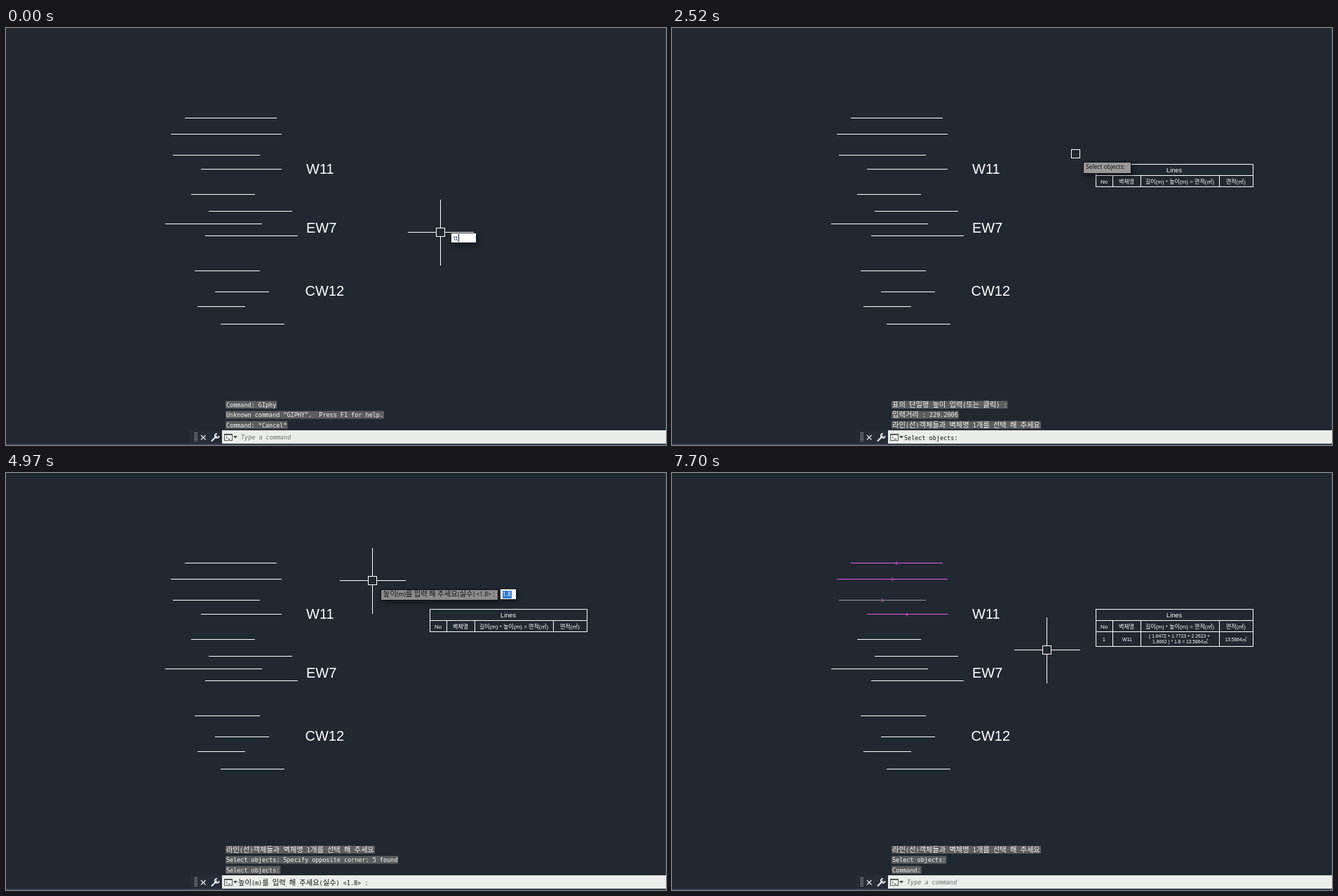
Recreate the animation shown at these times as an HTML page. Size 941 by 595 pixels, loop 8000 ms.

```html
<!DOCTYPE html>
<html lang="ko">
<head>
<meta charset="utf-8">
<title>Area table command</title>
<style>
html, body { margin: 0; width: 100%; height: 100%; overflow: hidden; background: #212830; }
svg { display: block; }
text { white-space: pre; }
.mono { font-family: "DejaVu Sans Mono", monospace; font-size: 8.46px; }
.ui { font-family: "Noto Sans", "Open Sans", sans-serif; font-size: 8.4px; }
.cad { font-family: "Liberation Sans", Arial, sans-serif; fill: #fff; }
.ko { font-family: "Noto Sans CJK KR", "Noto Sans CJK", sans-serif; }
.crisp { shape-rendering: crispEdges; }
.tip { filter: drop-shadow(3px 4px 4px rgba(0, 0, 0, .4)); }
</style>
</head>
<body>
<svg id="stage" width="941" height="595" viewBox="0 0 941 595"></svg>
<script>
const LOOP = 8000, STEP = 70;
const svg = document.getElementById('stage');

// Drawing: [x1, x2, y]
const LINES = [
  [255, 386, 128], [235, 393, 151], [238, 362, 181], [278, 393, 201],
  [264, 355, 237], [289, 408, 261], [227, 365, 279], [284, 416, 296],
  [269, 362, 346], [298, 375, 376], [273, 341, 397], [306, 397, 422]
];
const NAMES = [['W11', 428, 208], ['EW7', 428, 292], ['CW12', 426.5, 382]];

const ASK_TABLE = '새로운 표 생성(기본값)/다른 표 선택(s)';
const ASK_POINT = '표가 삽입 될 위치를 선택 해 주세요';
const ASK_ROW = '표의 단일행 높이 입력(또는 클릭) :';
const ASK_LINES = '라인(선)객체들과 벽체명 1개를 선택 해 주세요';
const ASK_HEIGHT = '높이(m)를 입력 해 주세요(실수) <1.8> :';
const SELECT = 'Select objects:';
const CORNER = 'Specify opposite corner:';
const ASK_FULL = ASK_TABLE + ' [기본값/s] <기본값> :';

const HISTORY = [
  'Command: GIphy', 'Unknown command “GIPHY”.  Press F1 for help.', 'Command: *Cancel*',
  'Command: TTT', ASK_FULL, ASK_POINT, ASK_ROW, '입력거리 : 229.2006', ASK_LINES,
  `${SELECT} ${CORNER} 5 found`, SELECT, ASK_HEIGHT, ASK_LINES, SELECT, 'Command:'
];

// start, first history row, prompt, cursor, tooltip [text, width]
const SCENES = [
  [0, 0, '', 'cross'],
  [420, 1, ASK_FULL, 'cross', [ASK_TABLE, 142]],
  [1190, 2, ASK_POINT, 'point', [ASK_POINT, 148]],
  [1750, 3, ASK_ROW, 'point', [ASK_ROW, 150]],
  [2450, 6, SELECT, 'pick', [SELECT, 69]],
  [3780, 6, `${SELECT} ${CORNER}`, 'point', [CORNER, 104]],
  [4200, 7, SELECT, 'pick', [SELECT, 69]],
  [4410, 8, ASK_HEIGHT, 'cross', [ASK_HEIGHT, 168]],
  [5390, 10, SELECT, 'pick', [SELECT, 69]],
  [7560, 12, '', 'cross']
];

// Cursor path: [time, x, y]
const PATH = [
  [0, 619, 291], [420, 619, 291], [700, 621, 292], [1120, 621, 292], [1330, 655, 262],
  [1610, 608, 199], [1680, 604, 194], [1750, 604, 194], [1960, 606, 182], [2240, 604, 179],
  [2450, 604, 179], [2800, 460, 179], [2940, 433, 212], [3080, 443, 232], [3150, 443, 232],
  [3290, 447, 232], [3360, 447, 232], [3500, 450, 227], [3710, 450, 227], [4130, 254, 64],
  [4200, 251, 64], [4340, 251, 64], [4550, 478, 139], [4970, 522, 153], [5040, 522, 153],
  [5180, 525, 155], [5740, 525, 155], [5950, 560, 190], [6160, 552, 242], [6230, 552, 242],
  [6370, 530, 259], [6510, 530, 259], [6580, 524, 261], [6650, 524, 261], [6930, 497, 255],
  [7140, 510, 246], [7350, 534, 252], [LOOP, 534, 252]
];

function cursorAt(t) {
  const i = Math.max(1, PATH.findIndex(p => p[0] >= t));
  const [a, b] = [PATH[i - 1], PATH[i]];
  const k = (t - a[0]) / (b[0] - a[0]);
  return [1, 2].map(n => Math.round(a[n] + (b[n] - a[n]) * k));
}

const esc = s => s.replace(/&/g, '&amp;').replace(/</g, '&lt;');
const mixed = (s, size) =>
  esc(s).replace(/[가-힣㎡]+/g, m => `<tspan class="ko" font-size="${size}">${m}</tspan>`);
const text = (s, x, y, cls, koSize, attrs = '') =>
  `<text x="${x}" y="${y}" class="${cls}" ${attrs}>${mixed(s, koSize)}</text>`;
const rect = (x, y, w, h, fill, attrs = '') =>
  `<rect x="${x}" y="${y}" width="${w}" height="${h}" fill="${fill}" ${attrs}/>`;
const path = (d, stroke, attrs = '') =>
  `<path d="${d}" fill="none" stroke="${stroke}" ${attrs}/>`;
const CRISP = 'class="crisp"';
const monoWidth = s => [...s].reduce((w, c) => w + (/[가-힣]/.test(c) ? 9.46 : 5.09), 0);

function drawing(t, x, y) {
  const done = t >= 5320, picked = t >= 4200 && t < 4410, drag = t >= 3780 && t < 4200;
  let out = '';
  LINES.forEach(([x1, x2, ly], i) => {
    const d = `M${x1} ${ly + .5}H${x2}`;
    if (i < 4 && (picked || (drag && ly > y && x2 > x))) {
      out += path(`M${x1 - 1} ${ly + .5}H${x2 + 1}`, '#2c62cf', 'stroke-width="3" stroke-linecap="round"')
        + path(d, '#a9c8ff', CRISP);
    } else {
      const color = done && i < 4 ? (i === 2 ? '#979a9d' : '#ee55ee') : '#fff';
      out += path(d, color, CRISP);
    }
    if (done && i < 4) {
      out += text('1', Math.floor((x1 + x2) / 2), ly + 2.7, 'cad', 6,
        'font-size="6.5" text-anchor="middle" style="fill:#ee55ee"');
    }
  });
  NAMES.forEach(([s, nx, ny], i) => {
    const glow = i === 0 && picked ? 'style="fill:#c4dcff;filter:drop-shadow(0 0 1px #2c62cf)"' : '';
    out += text(s, nx, ny, 'cad', 20, `font-size="20" ${glow}`);
  });
  return out;
}

function table(t) {
  if (t < 2450) return '';
  const row = t >= 5390, end = row ? 247 : 226;
  const cell = (s, x, y, size) =>
    text(s, x, y, 'cad', size, `font-size="${size}" text-anchor="middle"`);
  let out = path(`M604.5 194.5H828.5V${end}.5H604.5ZM604 210.5H829M604 226.5H829`
    + [628, 668, 780].map(x => `M${x}.5 210V${end}`).join(''), '#fff', CRISP);
  out += cell('Lines', 716, 206, 9.2) + cell('No', 616, 222, 8) + cell('벽체명', 648, 222, 8)
    + cell('길이(m) * 높이(m) = 면적(㎡)', 724, 221.5, 8) + cell('면적(㎡)', 804, 221.5, 8);
  if (row) {
    out += cell('1', 616, 240, 6.8) + cell('W11', 649, 240, 7)
      + cell('( 1.6472 + 1.7723 + 2.2623 +', 723.5, 235, 6.73)
      + cell('1.8662 ) * 1.8 = 13.5864㎡', 724.5, 243, 6.73)
      + cell('13.5864㎡', 804, 240, 6.73);
  }
  return out;
}

function commandBar(t, first, prompt) {
  let out = '';
  HISTORY.slice(first, first + 3).forEach((s, i) => {
    const y = 532 + i * 14.4;
    out += rect(313, y, monoWidth(s) + 2, 11, '#5c5d5e', 'rx="1"')
      + text(s, 314, y + 8.8, 'mono', 10.28, 'fill="#f4f4f4"');
  });
  const active = t >= 4270 && t < 4410;
  out += rect(0, 593, 941, 2, '#353e4d') + rect(940, 0, 1, 574, '#343c47')
    + rect(263, 574, 45, 19, '#262d37')
    + rect(308, 574, 633, 19, active ? '#fff' : '#ebedeb', CRISP);
  // grip, close, wrench, prompt icon, arrow
  out += path('M269.5 577V590M272 577V590', '#d0d3d6', 'stroke-width="1.2" stroke-dasharray="1.2 1.2"')
    + path('M278 581L284.5 587.5M284.5 581L278 587.5', '#e6e8ea', 'stroke-width="1.3"')
    + path('M293.5 589L300 582.5', '#e6e8ea', 'stroke-width="2.2" stroke-linecap="round"')
    + path('M301 578.8A3 3 0 1 0 303.8 582', '#e6e8ea', 'stroke-width="1.8"')
    + rect(311.5, 579.5, 11, 9, '#f8f8f8', 'stroke="#555"')
    + path('M311 580.5H323', '#555')
    + path('M313.5 582.5L315.5 584.2L313.5 586M316.5 586.5H320', '#333', 'stroke-width=".9"')
    + '<path d="M324 582H330L327 585.5Z" fill="#444"/>';
  out += prompt
    ? text(prompt, 331, 587.7, 'mono', 10.28, 'fill="#111"')
    : text('Type a command', 335, 586.6, 'mono', 10, 'fill="#6e7070" font-style="italic"');
  if (active) out += rect(414, 579, 1, 11, '#111', CRISP);
  return out;
}

function field(x, y, w, s, selected) {
  const len = s.length * 4.3;
  return rect(x, y, w, 14, '#fff', CRISP)
    + (selected ? rect(x + 3, y + 2, Math.min(len, w - 5), 11, '#2a78d0', CRISP) : '')
    + text(s, x + 3, y + 10, 'ui', 10, `fill="${selected ? '#fff' : '#222'}"`);
}

function tooltip(t, x, y, mode, tip) {
  if (t < 420) {
    const s = t < 280 ? 'tt' : 'ttt';
    return `<g class="tip">${rect(x + 16, y + 2, 35, 13, '#fff', CRISP)}`
      + text(s, x + 19, y + 11.5, 'ui', 10, 'fill="#1c3a66"')
      + rect(x + 20 + s.length * 3, y + 3, 1, 11, '#111', CRISP) + '</g>';
  }
  if (!tip) return '';
  const [s, w] = tip, pick = mode === 'pick';
  const tx = x + (pick ? 11 : 12), ty = y + (pick ? 12 : 13);
  const blank = t >= 1680 && t < 1750;
  let out = pick || !blank
    ? rect(tx + .5, ty + .5, w - 1, 16 - !pick, pick ? '#999' : '#8c8c8c', 'stroke="#0c0e10"')
    : rect(tx, ty, w, 16, '#999');
  if (!blank) out += text(s, tx + (pick ? 4 : 3.5), ty + 10.3, 'ui', 10.5, 'fill="#151515"');
  const fx = tx + w + 3;
  if (blank) {
    out += rect(fx - 1.5, ty + .5, 38, 14, '#1f262e', 'stroke="#12161b"')
      + rect(fx + 39.5, ty + .5, 27, 14, '#1f262e', 'stroke="#12161b"');
  } else if (s === ASK_POINT || s === CORNER) {
    out += field(fx - 2, ty, 39, (x * 14.325).toFixed(2), true)
      + field(fx + 39, ty, 28, ((595 - y) * 14.325).toFixed(1), false);
  } else if (s === ASK_ROW) {
    out += field(fx, ty, 38, (Math.hypot(x - 604, y - 195) * 14.325).toFixed(2), true);
  } else if (s === ASK_HEIGHT) {
    out += field(fx, ty, 22, '1.8', true);
  } else if (s === ASK_TABLE) {
    out += field(fx, ty, 18, '', false);
  }
  return `<g class="tip">${out}</g>`;
}

function cursor(t, x, y, mode) {
  let out = '';
  if (t >= 1750 && t < 2450) out += path(`M604.5 194.5L${x + .5} ${y + .5}`, '#d8d8d8', 'stroke-dasharray="3 2"');
  if (t >= 3780 && t < 4200) {
    out += rect(x + .5, y + .5, 450 - x, 227 - y, 'rgba(40,150,60,.28)',
      'class="crisp" stroke="#fff" stroke-dasharray="4 3"');
  }
  const box = 'M-6 -6H6V6H-6Z';
  const shapes = {
    cross: box + 'M-47 0H-6M6 0H47M0 -47V-6M0 6V47',
    point: 'M-47 0H47M0 -47V47',
    pick: box
  };
  const d = t >= 1680 && t < 1750 ? 'M-5 0H47M0 -1V47' : shapes[mode];
  return out + path(d, '#fff', `class="crisp" transform="translate(${x + .5} ${y + .5})"`);
}

function render(t) {
  const [, first, prompt, mode, tip] = SCENES.filter(s => s[0] <= t).pop();
  const [x, y] = cursorAt(t);
  svg.innerHTML = rect(0, 0, 941, 595, '#212830') + drawing(t, x, y) + table(t)
    + commandBar(t, first, prompt) + cursor(t, x, y, mode) + tooltip(t, x, y, mode, tip);
}

let last = -1;
function tick() {
  const t = Math.floor((performance.now() % LOOP) / STEP) * STEP;
  if (t !== last) render(last = t);
  requestAnimationFrame(tick);
}
tick();
</script>
</body>
</html>
```
